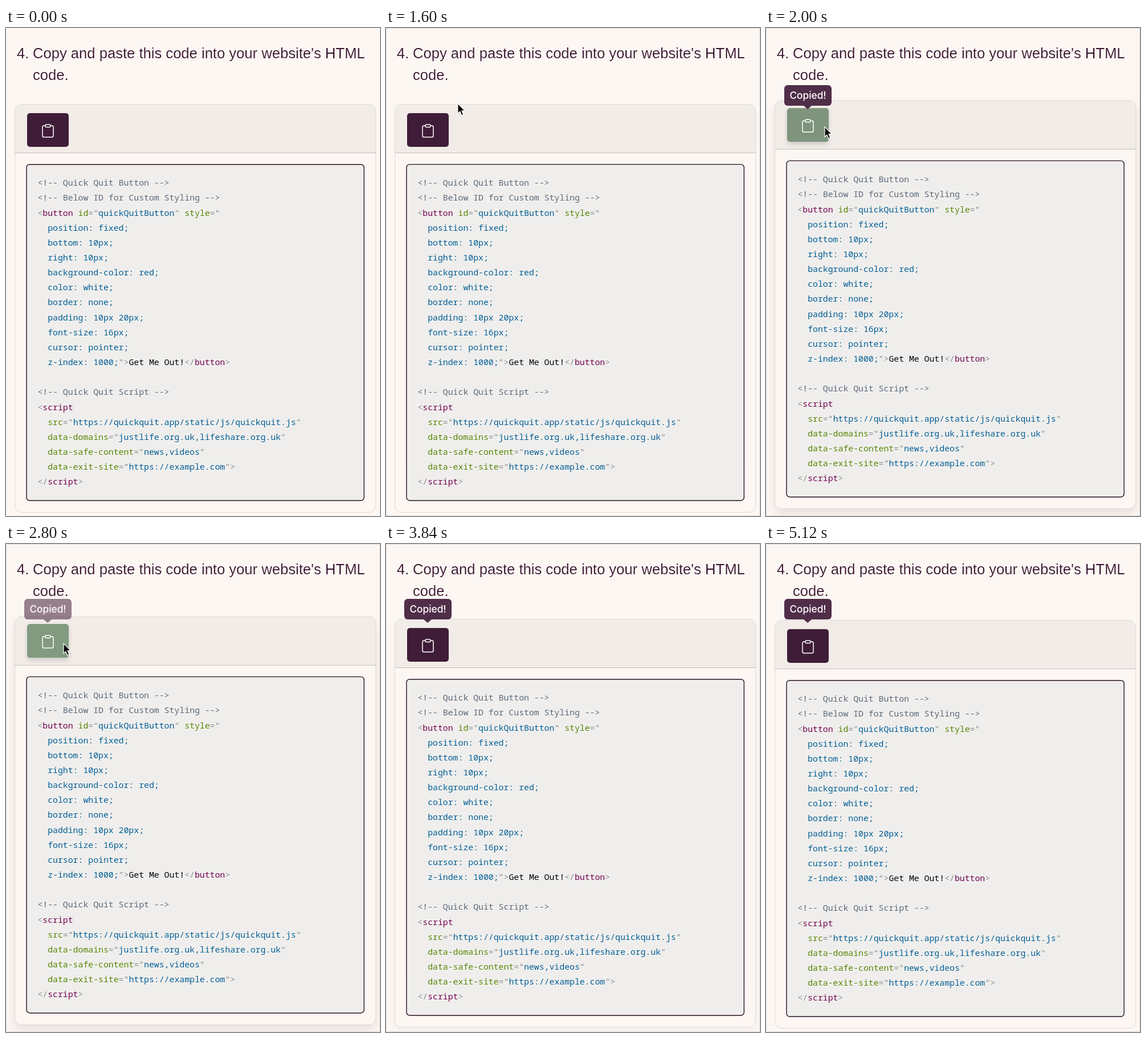
Recreate the animation shown at these times as an HTML page. Size 656 by 854 pixels, loop 5200 ms.

```html
<!DOCTYPE html>
<html lang="en">
<head>
<meta charset="utf-8">
<title>Copy the code</title>
<style>
html, body { margin: 0; width: 100%; height: 100%; overflow: hidden; background: #fdf7f3; }
div, pre, svg { position: absolute; box-sizing: border-box; }
#stage { width: 656px; height: 854px; overflow: hidden; background: #fdf7f3; }
.head { top: 25px; left: 47px; white-space: pre; color: #35132e; -webkit-text-stroke: .2px #fdf7f3;
  font: 25.6px/38px "Liberation Sans", Arial, sans-serif; }
#card { left: 15px; top: 133px; width: 634px; height: 715px; border: 1px solid #dfd9d6; border-radius: 12px;
  background: #fdf7f3; overflow: hidden; }
.bar { left: 0; top: 0; width: 100%; height: 85px; background: #f1ece8; border-bottom: 1px solid #c4bebb; }
#button { left: 21px; top: 15px; width: 73px; height: 59px; border-radius: 5px; }
#button svg, .box { left: 0; top: 0; }
pre { margin: 0; left: 39.4px; top: 123.2px; color: #005a90; text-shadow: 0 1px #fff;
  font: 500 14.82px/26.15px "Noto Sans Mono", "DejaVu Sans Mono", monospace; }
pre * { font-style: normal; font-weight: inherit; text-decoration: none; }
i { color: #848484; }
b { color: #70004b; }
u { color: #538000; }
s { color: #586473; }
em { color: #000; }
#tip { left: 32px; width: 83px; height: 36px; border-radius: 6px; background: #421e3b; color: #fff;
  font: 500 17.3px/36px Inter, Roboto, sans-serif; text-align: center; }
#tip::after { content: ""; position: absolute; left: 34px; top: 36px; border: 7px solid transparent;
  border-top: 6px solid #421e3b; border-bottom: 0; }
#edge { inset: 0; border: 1px solid #dedbd9; }
#cursor { left: 0; top: 0; overflow: visible; }
</style>
</head>
<body>
<div id="stage">
  <div class="head" style="left:19px">4.</div>
  <div class="head">Copy and paste this code into your website's HTML
code.</div>
  <div id="card">
    <div class="bar"></div>
    <div id="button">
      <svg width="73" height="59" fill="none" stroke="#fff" stroke-width="1.5">
        <path d="M32 22h-2.5q-2.5 0-2.5 2.5v15q0 2.5 2.5 2.5h14q2.5 0 2.5-2.5v-15q0-2.5-2.5-2.5h-2.5"/>
        <rect x="32" y="20" width="9" height="4.5" rx="1.5"/>
      </svg>
    </div>
    <svg class="box" width="632" height="713">
      <rect x="20" y="104.7" width="592" height="588.3" rx="5.5" fill="#efeeec" stroke="#2a1025" stroke-width="1.4"/>
    </svg>
<pre><s>&lt;!-- Quick Quit Button --&gt;</s>
<s>&lt;!-- Below ID for Custom Styling --&gt;</s>
<i>&lt;</i><b>button</b> <u>id</u><i>="</i>quickQuitButton<i>"</i> <u>style</u><i>="</i>
  position: fixed;
  bottom: 10px;
  right: 10px;
  background-color: red;
  color: white;
  border: none;
  padding: 10px 20px;
  font-size: 16px;
  cursor: pointer;
  z-index: 1000;<i>"&gt;</i><em>Get Me Out!</em><i>&lt;/</i><b>button</b><i>&gt;</i>

<s>&lt;!-- Quick Quit Script --&gt;</s>
<i>&lt;</i><b>script</b>
  <u>src</u><i>="</i>https://quickquit.app/static/js/quickquit.js<i>"</i>
  <u>data-domains</u><i>="</i>justlife.org.uk,lifeshare.org.uk<i>"</i>
  <u>data-safe-content</u><i>="</i>news,videos<i>"</i>
  <u>data-exit-site</u><i>="</i>https://example.com<i>"&gt;</i>
<i>&lt;/</i><b>script</b><i>&gt;</i></pre>
  </div>
  <div id="tip">Copied!</div>
  <div id="edge"></div>
  <svg id="cursor" width="14" height="22">
    <path d="M0 0V17.5L3.9 13.9 6.7 20.6 9.8 19.3 7 12.7H12.4Z" fill="#000" stroke="#fff" stroke-width="1.2"/>
  </svg>
</div>
<script>
const LOOP = 5200;
const $ = id => document.getElementById(id);
const [card, button, tip, edge, cursor] = ['card', 'button', 'tip', 'edge', 'cursor'].map($);

// Cursor path: time, x, y
const path = [
  [1200, 222, -24], [1280, 198, 8], [1600, 126, 132], [1840, 104, 172], [2000, 103, 173],
  [2800, 101, 174], [3280, 101, 174], [3440, 128, 148], [3600, 200, -24]
];

const ramp = (t, from, length) => Math.min(1, Math.max(0, (t - from) / length));
const ease = (t, from, length) => {
  const p = ramp(t, from, length);
  return 1 - (1 - p) ** 2 * (1 + p * .6);
};
const mix = (a, b, p) => a + (b - a) * p;
const show = (el, on) => el.style.visibility = on ? 'visible' : 'hidden';

function cursorAt(t) {
  const k = Math.max(1, path.findIndex(p => p[0] >= t));
  const [a, b] = [path[k - 1], path[k]];
  const p = ramp(t, a[0], b[0] - a[0]);
  return [mix(a[1], b[1], p), mix(a[2], b[2], p)];
}

function draw(t) {
  const lift = ease(t, 1600, 260) - ease(t, 3690, 300);
  const hover = ease(t, 1780, 270) - ease(t, 3360, 260);
  card.style.transform = `translateY(${-6.3 * lift}px)`;
  card.style.boxShadow = `0 8px 16px rgba(40,20,35,${.1 * lift})`;
  button.style.transform = `translateY(${-2.6 * hover}px)`;
  button.style.background = `rgb(${mix(63, 130, hover)},${mix(29, 154, hover)},${mix(56, 128, hover)})`;
  button.style.boxShadow = `0 4px 8px rgba(0,0,0,${.15 * hover})`;

  // The second click places the tooltip anew
  const again = t >= 2720;
  tip.style.top = (again ? 96 : 100) + 'px';
  tip.style.opacity = .92 * ramp(t, again ? 2712 : 1850, 150);

  show(edge, t >= 800);
  show(cursor, t >= 1200 && t < 3600);
  const [x, y] = cursorAt(Math.min(t, 3600));
  cursor.style.transform = `translate(${x}px,${y}px)`;
}

const start = performance.now();
function tick() {
  draw((performance.now() - start) % LOOP);
  requestAnimationFrame(tick);
}
tick();
</script>
</body>
</html>
```
